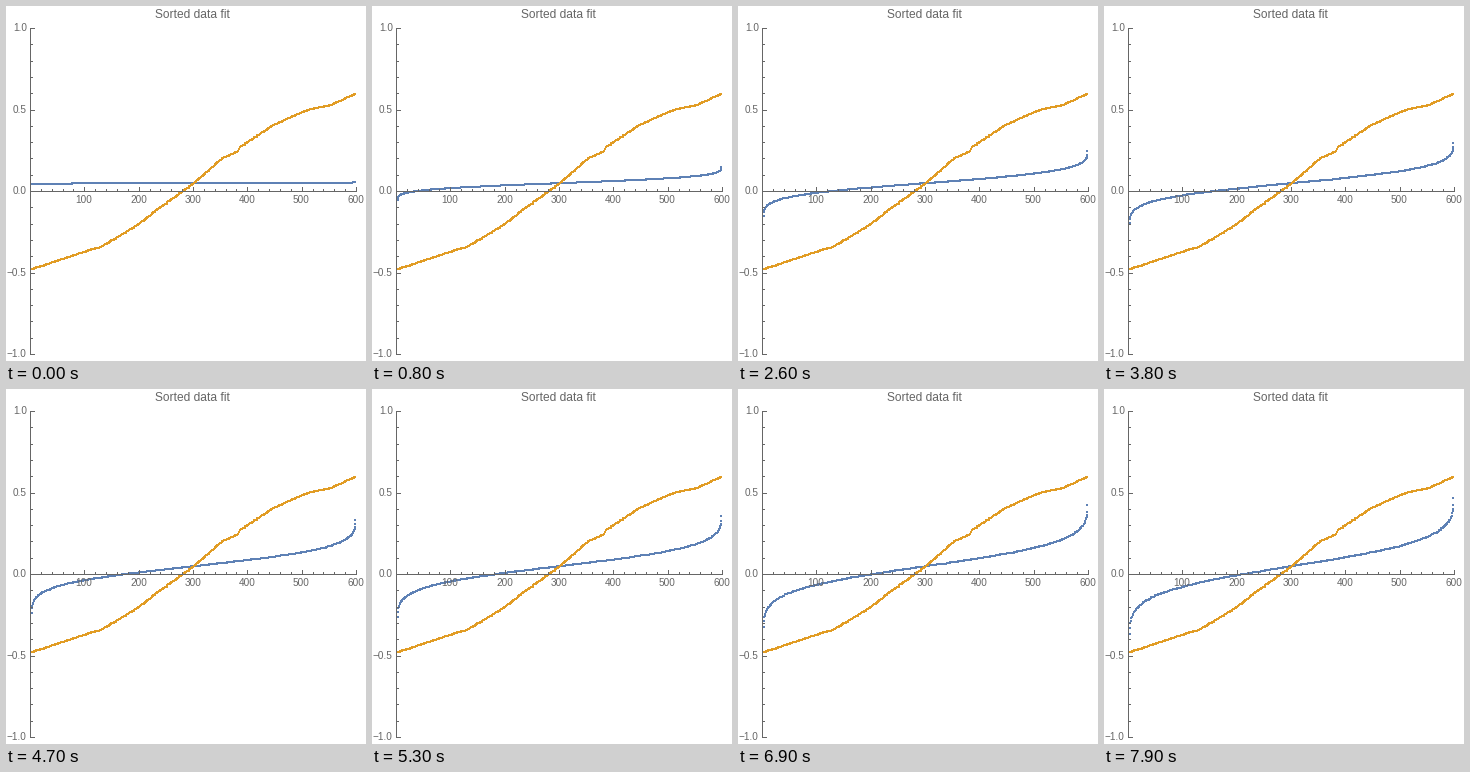
Animation, 360 px wide and 355 px high, one loop 8 s. Source, as a matplotlib script:

```python
import matplotlib.pyplot as plt
import numpy as np
from matplotlib.animation import FuncAnimation

W, H, DPI = 360, 355, 100
PX = 72 / DPI
FRAMES, STEP = 80, 100
BLUE, ORANGE, GRAY = "#5e81b5", "#e19c24", "#666666"
LEFT, RIGHT, TOP, ZERO, BOTTOM = 24.5, 350.5, 21.5, 184.5, 347.5
N = 600

plt.rcParams["font.family"] = "Liberation Sans"
fig = plt.figure(figsize=(W / DPI, H / DPI), dpi=DPI, facecolor="white")
ax = fig.add_axes([0, 0, 1, 1])
ax.set(xlim=(0, W), ylim=(H, 0))
ax.axis("off")


def x_of(n):
    return LEFT + n * (RIGHT - LEFT) / N


def y_of(v):
    return ZERO - v * (BOTTOM - TOP) / 2


def stroke(x0, y0, x1, y1):
    # The offsets keep each line inside its own pixel row or column when snapped.
    x, y = np.floor([x0, x1]) + 0.3, np.floor([y0, y1]) + 0.7
    ax.plot(x, y, color=GRAY, lw=PX, zorder=3, solid_capstyle="projecting",
            antialiased=False)


def label(x, y, text, size=10, ha="center"):
    ax.text(x, y, text, size=size * PX, color=GRAY, ha=ha, va="baseline", zorder=4)


def dots(color, zorder):
    return ax.plot([], [], "s", ms=2 * PX, mew=0, color=color,
                   antialiased=False, zorder=zorder)[0]


def draw_axes():
    stroke(LEFT, TOP, LEFT, BOTTOM)
    stroke(LEFT, ZERO, RIGHT, ZERO)
    for n in range(20, N + 1, 20):
        major = n % 100 == 0
        stroke(x_of(n), ZERO, x_of(n), ZERO - (4 if major else 2))
        if major:
            label(x_of(n) - 0.7, 197.3, str(n))
    for k in range(-10, 11):
        major = k % 5 == 0
        y = y_of(k / 10)
        stroke(LEFT, y, LEFT + (4 if major else 2), y)
        if major:
            label(20.8, y + 3.8, f"{k / 10:.1f}".replace("-", "\u2212"), ha="right")
    label(186, 12.3, "Sorted data fit", 12)


def settle(v, noise, seed):
    """Roughen the values, sort them and snap them to pixel rows."""
    rough = v + np.random.default_rng(seed).normal(0, noise, N)
    return np.round(y_of(np.sort(rough)))


rank = np.arange(1, N + 1)
px = np.clip(np.round(x_of(rank)), 26, 349)

# Normal quantiles of the ranks (Tukey lambda approximation)
p = (rank - 0.5) / N
quantile = 5.65 * (p ** 0.12 - (1 - p) ** 0.12)

# Sorted data: value at a few ranks
DATA = [(0, -0.485), (100, -0.375), (133, -0.34), (198, -0.21), (231, -0.122),
        (299, 0.04), (354, 0.2), (380, 0.237), (386, 0.267), (446, 0.4),
        (509, 0.495), (553, 0.525), (600, 0.595)]


def spread(t):
    """Standard deviation of the fit: a quick start, then steady growth."""
    return 0.0018 + 0.0129 * t + 0.0258 * (1 - np.exp(-t / 0.6))


draw_axes()
blue = dots(BLUE, 1)
orange = dots(ORANGE, 2)
orange.set_data(px, settle(np.interp(rank, *zip(*DATA)), 0.002, 7))


def update(i):
    s = spread(i * STEP / 1000)
    blue.set_data(px, settle(0.045 + s * quantile, 0.02 * s, i))
    return [blue]


anim = FuncAnimation(fig, update, frames=FRAMES, interval=STEP, repeat=True, repeat_delay=0)
plt.show()
```
